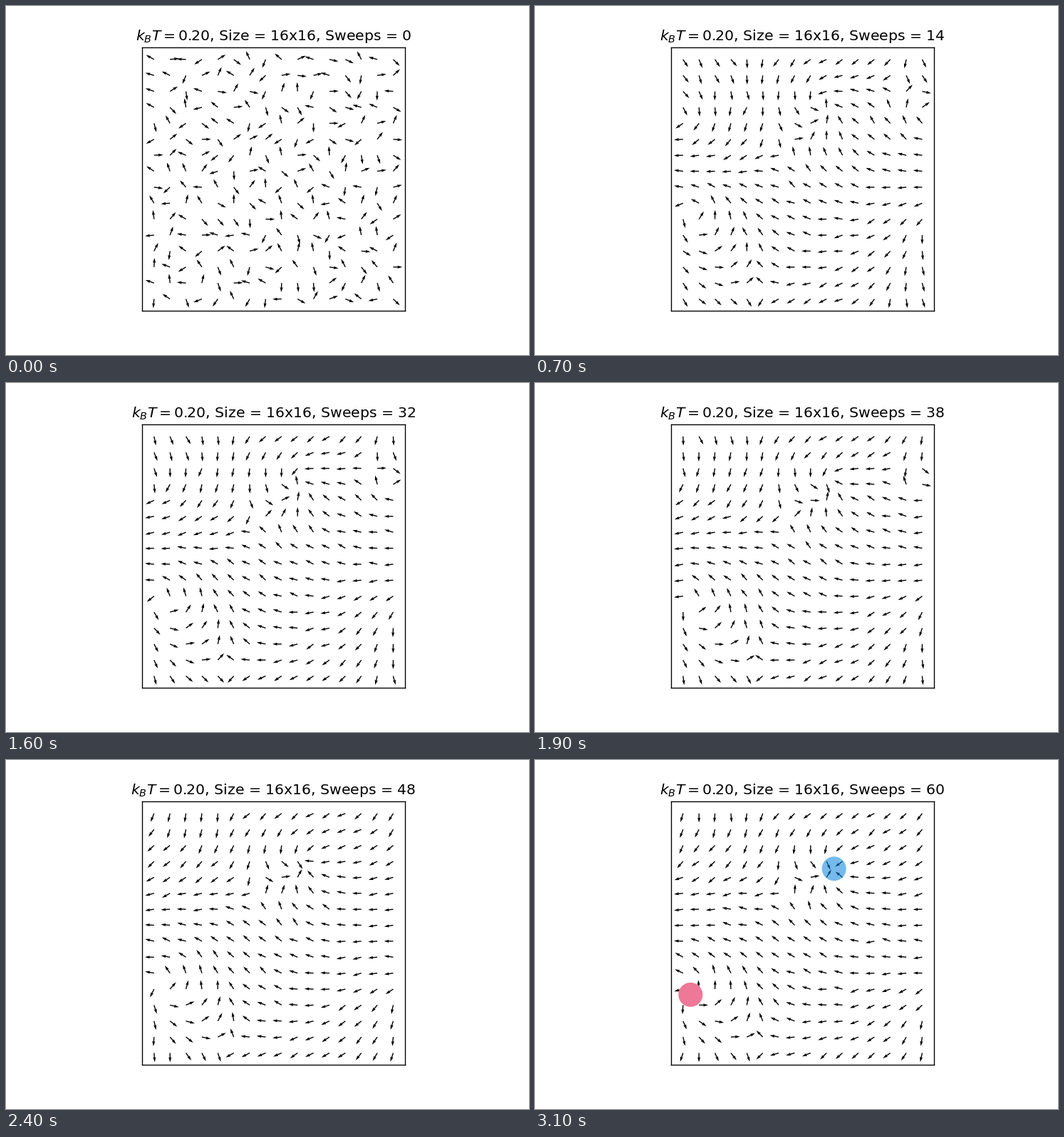
Recreate the animation shown at these times as a matplotlib script. Size 734 by 489 pixels, loop 6.1 s.

```python
import numpy as np
import matplotlib.pyplot as plt
from matplotlib.animation import FuncAnimation
from matplotlib.patches import Circle

WIDTH, HEIGHT, DPI = 734, 489, 122.5
BOX = 369.2                 # side of the plot in pixels
SIZE = 16
SETTLED, LAST = 7, 30       # first ordered step, last simulated step
ANNIHILATION = 23           # step at which the short-lived pair meets
STEPS, INTERVAL = 61, 100

# Vortex centres on the lattice as x + iy: charge, early place, late place.
VORTICES = [
    (+1, 8.6 + 12.4j, 9.47 + 11.54j),
    (+1, 0.5 + 5.3j, 0.47 + 3.65j),
    (-1, 6.5 + 9.4j, 6.6 + 10.5j),
    (-1, 4.5 + 0.5j, 4.5 + 0.5j),
]
PAIR_CENTRE, PAIR_ARM = 14.5 + 12.4j, 1.2 - 1.1j
REFERENCE, REFERENCE_ANGLE = (8, 12), np.radians(173)

x, y = np.meshgrid(np.arange(SIZE), np.arange(SIZE)[::-1])
sites = x + 1j * y
disorder = np.random.default_rng(4).uniform(-np.pi, np.pi, sites.shape)


def vortices_at(step):
    """Charges and places of all vortices, drifting between steps."""
    drift = np.clip((step - SETTLED) / (LAST - SETTLED), 0, 1)
    vortices = [(q, a + drift * (b - a)) for q, a, b in VORTICES]
    if step < ANNIHILATION:
        arm = PAIR_ARM * np.sqrt(1 - step / ANNIHILATION)
        vortices += [(+1, PAIR_CENTRE + arm), (-1, PAIR_CENTRE - arm)]
    return vortices


def vortex_field(step):
    """Spin angles around vortices on a lattice that wraps on all sides."""
    vortices = vortices_at(step)
    dipole = sum(q * place.real for q, place in vortices)
    angles = -2 * np.pi * dipole * y / SIZE**2
    for q, place in vortices:
        for image in range(-2, 3):
            offset = sites - place - 1j * image * SIZE
            angles = angles + q * np.angle(np.sin(np.pi * offset / SIZE))
    return angles - angles[REFERENCE] + REFERENCE_ANGLE


def spin_angles(step):
    memory = np.exp(-step / 1.8)
    spins = memory * np.exp(1j * disorder) + (1 - memory) * np.exp(1j * vortex_field(step))
    heat = np.random.default_rng(100 + step).normal(0, 0.13, sites.shape)
    return np.angle(spins) + heat


fig = plt.figure(figsize=((WIDTH + 0.001) / DPI, (HEIGHT + 0.001) / DPI),
                 dpi=DPI, facecolor="white")
ax = fig.add_axes([191 / WIDTH, 61.7 / HEIGHT, BOX / WIDTH, BOX / HEIGHT])
ax.set(xlim=(-0.75, 15.75), ylim=(-0.75, 15.75), xticks=[], yticks=[])
title = ax.set_title("", fontsize=12)

arrows = ax.quiver(x, y, np.ones(x.shape), np.zeros(x.shape),
                   scale=28.8, width=0.00375, zorder=2)
markers = [
    ax.add_patch(Circle((place.real, place.imag), 0.76, color=color, alpha=alpha,
                        lw=0, zorder=3))
    for (_, _, place), color, alpha in zip(VORTICES, ("#0f86dc", "#ed7897"), (0.57, 1))
]


def update(frame):
    step = min(frame, LAST)
    angles = spin_angles(step)
    arrows.set_UVC(np.cos(angles), np.sin(angles))
    title.set_text(f"$k_BT = 0.20$, Size = {SIZE}x{SIZE}, Sweeps = {2 * step}")
    for marker in markers:
        marker.set_visible(frame > LAST)
    return [arrows, title, *markers]


anim = FuncAnimation(fig, update, frames=STEPS, interval=INTERVAL,
                     repeat=True, repeat_delay=0, blit=False)
plt.show()
```
